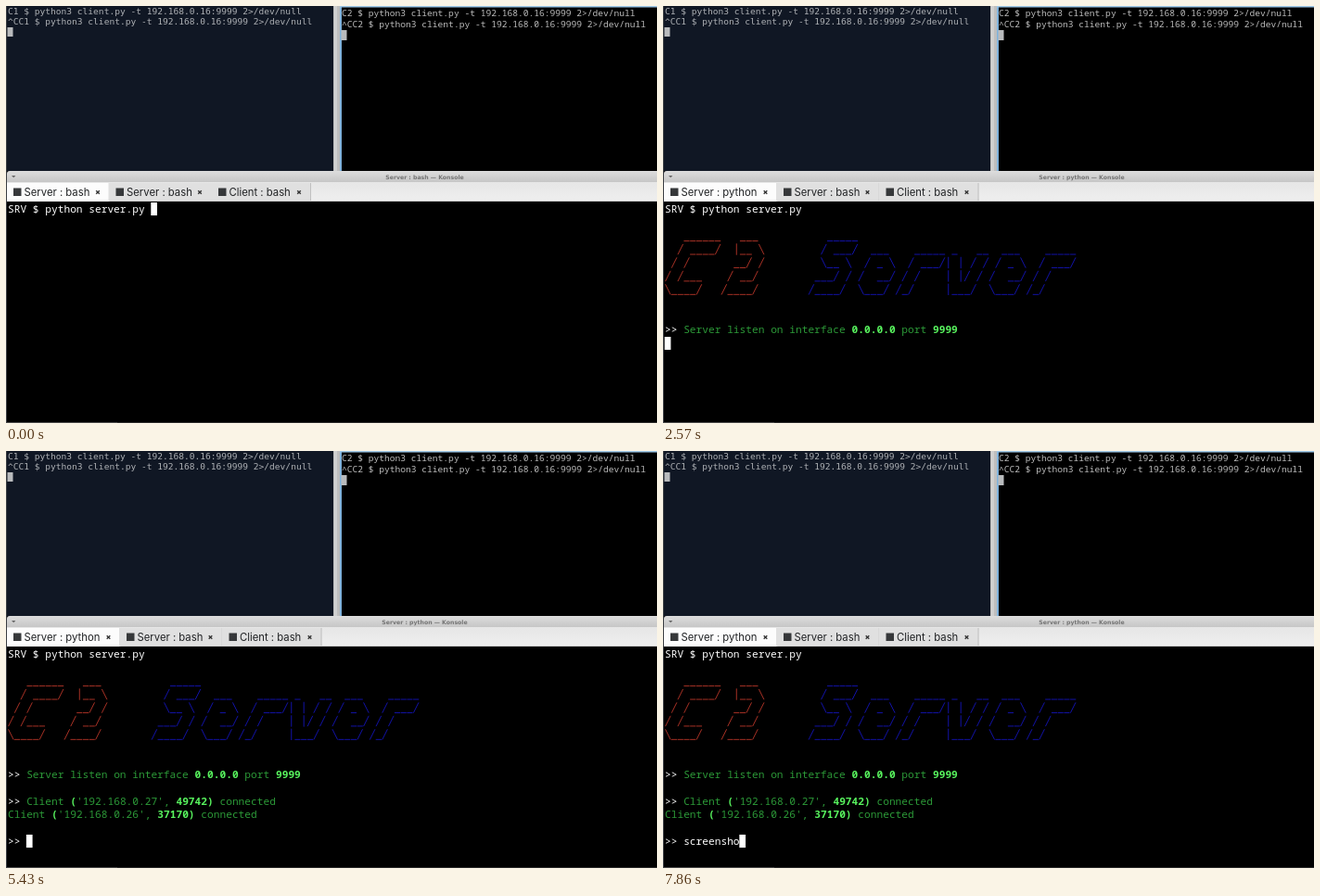
An HTML page with a canvas that plays this animation: 702x450 px, repeating every 8 s.

```html
<!DOCTYPE html>
<html lang="en">
<head>
<meta charset="utf-8">
<title>Terminal session</title>
<style>
  html, body { margin: 0; width: 100%; height: 100%; overflow: hidden; background: #000; }
  canvas { display: block; width: 702px; height: 450px; }
</style>
</head>
<body>
<canvas id="stage" width="702" height="450"></canvas>
<script>
const ctx = document.getElementById('stage').getContext('2d');
const LOOP = 8000;
const MONO = '"Noto Sans Mono", monospace';
const WHITE = '#fff', GREEN = '#2c9a38', BRIGHT = '#58f45e', RED = '#b03428', BLUE = '#1414b0';

// Server terminal grid
const COL = 6.72, ROW = 14.44, LEFT = 2, TOP = 211.8;

// Times of the session's events
const ENTER = 860, STARTED = 1140, BANNER = 1430, PROMPT1 = 2860,
      CLIENT1 = 3000, CLIENT2 = 3290, PROMPT2 = 4710;
const COMMAND = 'screensho';
const KEYS = [6570, 6710, 6860, 7000, 7140, 7430, 7570, 7710, 7860];

const LOGO = [
  '   ______   ___',
  '  / ____/  |__ \\',
  ' / /       __/ /',
  '/ /___    / __/',
  '\\____/   /____/'
];
const NAME = [
  '   _____',
  '  / ___/  ___    _____ _   __  ___    _____',
  '  \\__ \\  / _ \\  / ___/| | / / / _ \\  / ___/',
  ' ___/ / /  __/ / /    | |/ / /  __/ / /',
  '/____/  \\___/ /_/     |___/  \\___/ /_/'
];

// Ends of each banner stroke within its cell: x as a share of the width, y from the baseline
const STROKES = {
  '/': [0.08, 1.9, 0.92, -9.4],
  '\\': [0.08, -9.4, 0.92, 1.9],
  '|': [0.5, -10, 0.5, 2.4],
  '_': [0.04, 1.7, 0.96, 1.7]
};

function rect(x, y, w, h, color) {
  ctx.fillStyle = color;
  ctx.fillRect(x, y, w, h);
}

function text(str, x, y, font, color, align = 'left') {
  ctx.font = font;
  ctx.fillStyle = color;
  ctx.textAlign = align;
  ctx.fillText(str, x, y);
}

function gradient(y0, y1, from, to) {
  const g = ctx.createLinearGradient(0, y0, 0, y1);
  g.addColorStop(0, from);
  g.addColorStop(1, to);
  return g;
}

const cellX = col => LEFT + col * COL;
const baseline = row => TOP + row * ROW + 11.2;

function put(row, col, str, color, bold) {
  text(str, cellX(col), baseline(row), `${bold ? 700 : 500} 11.2px ${MONO}`, color);
}

// Prints consecutive [string, color, bold] runs on one row
function putRuns(row, col, runs) {
  for (const [str, color, bold] of runs) {
    put(row, col, str, color, bold);
    col += str.length;
  }
}

function putBanner(lines, row, col, color) {
  ctx.strokeStyle = color;
  ctx.lineWidth = 0.95;
  ctx.beginPath();
  lines.forEach((line, r) => [...line].forEach((char, c) => {
    if (!STROKES[char]) return;
    const [x0, y0, x1, y1] = STROKES[char];
    const x = cellX(col + c), y = baseline(row + r);
    ctx.moveTo(x + x0 * COL, y + y0);
    ctx.lineTo(x + x1 * COL, y + y1);
  }));
  ctx.stroke();
}

function putClient(row, col, ip, port) {
  putRuns(row, col, [
    ['Client ', GREEN], ['(', BRIGHT, true], [`'${ip}', `, GREEN],
    [`${port})`, BRIGHT, true], [' connected', GREEN]
  ]);
}

function clientWindow(x, y, lineHeight, id, font, color) {
  const command = `${id} $ python3 client.py -t 192.168.0.16:9999 2>/dev/null`;
  text(command, x, y, font, color);
  text('^C' + command, x, y + lineHeight, font, color);
  rect(x - 0.5, Math.round(y + lineHeight * 1.25), 6, Math.round(lineHeight - 0.8), '#b9bbbd');
}

function topWindows() {
  rect(0, 0, 354, 178, '#101724');
  rect(353, 0, 7, 178, '#bebebe');
  rect(354, 0, 3, 178, '#d0d0d0');
  rect(360, 0, 2, 178, '#7fb2dc');
  rect(360, 0, 342, 1.5, '#9cc6e6');
  clientWindow(2, 9, 11.1, 'C1', '9.57px "DejaVu Sans Mono", monospace', '#aeb1b5');
  clientWindow(362, 11, 12.1, 'C2', `9.6px ${MONO}`, '#bcbcbc');
}

function tab(x, width, label, active) {
  rect(x, 191, width, 20, active ? '#fcfcfc' : '#e0e0e0');
  rect(x + width - 1, 191, 1, 20, '#c0c0c0');
  rect(x + 8, 196.5, 8.5, 8.5, '#36383a');
  text(label, x + 19.5, 205, '11.3px Inter, sans-serif', '#202224');
  const cx = x + width - 13, cy = 201;
  ctx.strokeStyle = '#333';
  ctx.lineWidth = 1.4;
  ctx.beginPath();
  ctx.moveTo(cx - 1.8, cy - 1.8);
  ctx.lineTo(cx + 1.8, cy + 1.8);
  ctx.moveTo(cx + 1.8, cy - 1.8);
  ctx.lineTo(cx - 1.8, cy + 1.8);
  ctx.stroke();
}

function windowFrame(process) {
  ctx.fillStyle = gradient(178, 190, '#dddddd', '#c6c6c6');
  ctx.beginPath();
  ctx.roundRect(1, 178, 704, 14, [3, 0, 0, 0]);
  ctx.fill();
  text(`Server : ${process} — Konsole`, 451.5, 186.6,
    'bold 6.2px "DejaVu Sans", sans-serif', '#747474', 'center');
  ctx.fillStyle = '#666';
  ctx.beginPath();
  ctx.moveTo(6, 183);
  ctx.lineTo(10.4, 183);
  ctx.lineTo(8.2, 185.3);
  ctx.fill();

  rect(0, 190, 702, 21, gradient(190, 211, '#e6e6e6', '#efefef'));
  const first = process === 'bash' ? 112 : 123.5;
  tab(0, first, `Server : ${process}`, true);
  tab(first - 1.5, 111.5, 'Server : bash');
  tab(first + 109, 108, 'Client : bash');
  rect(first, 210, 702 - first, 1, '#cccccc');
}

function serverOutput(t) {
  rect(0, 211, 702, 239, '#000');
  rect(0, 449, 702, 1, '#262626');
  rect(0, 449, 120, 1, '#444');
  put(0, 0, 'SRV $ python server.py', WHITE);

  if (t >= BANNER) {
    putBanner(LOGO, 2, 0, RED);
    putBanner(NAME, 2, 23, BLUE);
    putRuns(9, 0, [
      ['>> ', WHITE], ['Server listen on interface ', GREEN], ['0.0.0.0', BRIGHT, true],
      [' port ', GREEN], ['9999', BRIGHT, true]
    ]);
  }
  if (t >= PROMPT1) put(11, 0, '>>', WHITE);
  if (t >= CLIENT1) putClient(11, 3, '192.168.0.27', 49742);
  if (t >= CLIENT2) putClient(12, 0, '192.168.0.26', 37170);

  const typed = KEYS.filter(time => t >= time).length;
  if (t >= PROMPT2) put(14, 0, '>> ' + COMMAND.slice(0, typed), WHITE);

  const stops = [
    [0, 0, 23], [ENTER, 1, 0], [BANNER, 10, 0], [PROMPT1, 11, 3],
    [CLIENT1, 12, 0], [CLIENT2, 13, 0], [PROMPT2, 14, 3 + typed]
  ];
  const [, row, col] = stops.filter(stop => t >= stop[0]).pop();
  rect(cellX(col) - 0.3, Math.round(TOP + row * ROW + 0.5), COL, 14, WHITE);
}

function draw(now) {
  const t = now % LOOP;
  rect(0, 0, 702, 450, '#000');
  topWindows();
  windowFrame(t < STARTED ? 'bash' : 'python');
  serverOutput(t);
  rect(0, 0, 1, 450, '#3a3d42');
  requestAnimationFrame(draw);
}
requestAnimationFrame(draw);
</script>
</body>
</html>
```
